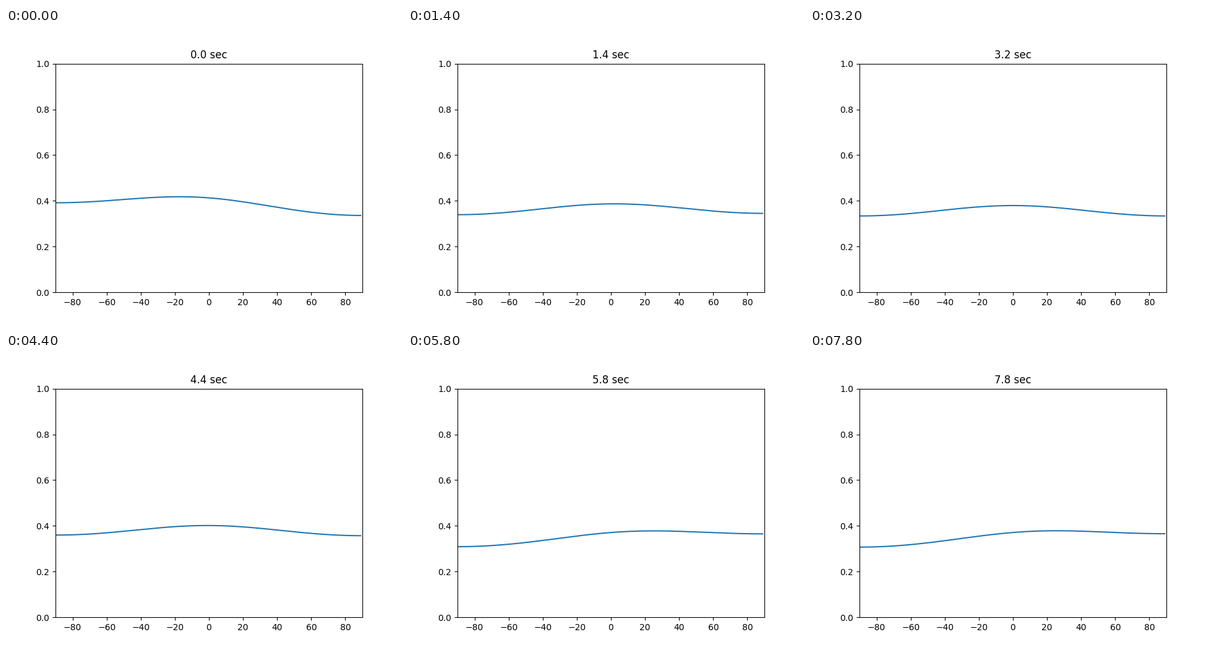
Write a matplotlib script that moves like this. It is 640 by 480 pixels and loops after 8 s.

```python
import numpy as np
import matplotlib.pyplot as plt
from matplotlib.animation import FuncAnimation

FRAMES, STEP = 40, 0.2

# Key poses of the beam: time (s), direction (deg), strength, peak level
TIME = [0, 1.4, 3.2, 4.4, 5.8, 6.8, 7.8]
DIRECTION = [-17.4, 2, 0, -1, 25, 21, 25.6]
STRENGTH = [0.112, 0.097, 0.099, 0.094, 0.081, 0.0525, 0.083]
PEAK = [0.418, 0.387, 0.3795, 0.4015, 0.378, 0.354, 0.3786]

angle = np.arange(-90, 90)


def sine(deg):
    return np.sin(np.radians(deg))


def response(t):
    """Beam pattern: a cosine of the path difference to the peak direction."""
    direction, strength, peak = (np.interp(t, TIME, v)
                                 for v in (DIRECTION, STRENGTH, PEAK))
    return peak - strength * (1 - np.cos(sine(angle) - sine(direction)))


fig, ax = plt.subplots(figsize=(6.4, 4.8), dpi=100)
ax.set_xlim(-90, 90)
ax.set_ylim(0, 1)
line, = ax.plot(angle, response(0), color="#1f77b4", lw=1.5)
title = ax.set_title("0.0 sec")


def update(i):
    t = i * STEP
    line.set_ydata(response(t))
    title.set_text(f"{t:.1f} sec")
    return line, title


anim = FuncAnimation(fig, update, frames=FRAMES, interval=STEP * 1000,
                     repeat=True, repeat_delay=0, blit=False)
plt.show()
```
